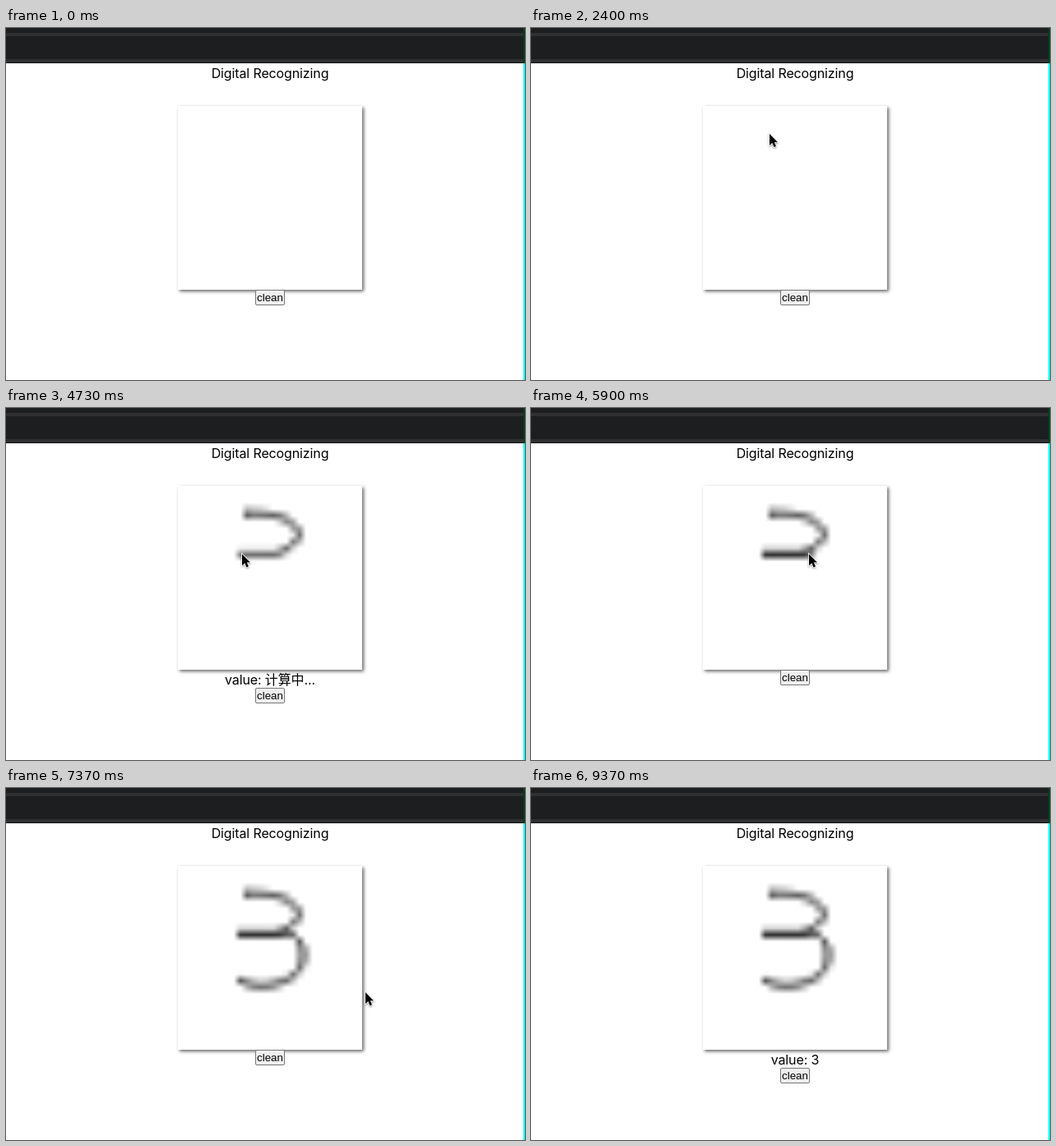
An HTML page with a canvas for the animation above (9.76 s loop, 631x429 px).

```html
<!DOCTYPE html>
<html lang="en">
<head>
<meta charset="utf-8">
<title>Digital Recognizing</title>
<style>
html, body { margin: 0; width: 100%; height: 100%; overflow: hidden; background: #fff; }
body { position: relative; font: 16px/22px Inter, "Noto Sans CJK SC", "Noto Sans CJK", sans-serif; letter-spacing: -.12px; }
body > * { position: absolute; }
#bar { left: 0; top: 0; width: 631px; height: 43px;
  background: linear-gradient(#1d1e20 6px, #303033 6px 10px, #1d1e20 10px 38px, #303033 38px 42px, #141416 42px); }
#edge { left: 629px; top: 0; width: 2px; height: 429px; background: linear-gradient(#04401c 43px, #0ff 43px); }
h1, #value { left: 0; width: 642px; margin: 0; text-align: center; font-size: 16px; font-weight: 400; }
h1 { top: 44px; }
#value { top: 320px; }
#pad { left: 209px; top: 95px; width: 224px; height: 224px; background: #fff; box-shadow: 2px 2px 4px #666; }
#clean { left: 303px; width: 36px; height: 19px; box-sizing: border-box; border: 1px solid #767676; border-radius: 2px;
  background: #efefef; font: 13.33px/17px "Liberation Sans", sans-serif; letter-spacing: 0; text-align: center; }
#cursor { left: 0; top: 0; overflow: visible; filter: drop-shadow(0 1px 1px #0006); }
</style>
</head>
<body>
<div id="bar"></div>
<div id="edge"></div>
<h1>Digital Recognizing</h1>
<canvas id="pad" width="28" height="28"></canvas>
<div id="value"></div>
<div id="clean">clean</div>
<svg id="cursor" width="12" height="18">
  <path d="M0 0V14L3.3 11L5.5 16.2L8 15.1L5.8 10.2H10Z" stroke="#fff" paint-order="stroke" stroke-width="1.6"/>
</svg>
<script>
const LOOP = 9760;
const $ = id => document.getElementById(id);
const ink = $('pad').getContext('2d');

// Pointer moves: start, end, target x, y, and the bend of a curved move
const moves = [
  [1270, 1270, 526, 124], [1270, 1330, 478, 121],
  [1530, 2230, 293, 127, 380, 119], [2370, 2400, 290, 129],
  [2900, 3570, 356, 155, 352, 127], [3570, 3870, 328, 178, 352, 170], [3870, 4330, 287, 178],
  [5500, 5560, 284, 178], [5560, 5940, 344, 178], [5940, 6200, 361, 204, 361, 182],
  [6200, 6470, 338, 235, 361, 228], [6470, 6820, 284, 234, 310, 248],
  [7050, 7470, 481, 256, 390, 240], [7470, 7830, 485, 258], [7830, 8070, 511, 271],
  [8600, 8800, 491, 285], [9030, 9370, 640, 40, 520, 220]
];
const strokes = [[2900, 4330], [5560, 6820]];
const labels = [
  [0, ''], [4730, 'value: 计算中...'], [5000, 'value: 2'], [5530, ''],
  [7400, 'value: 计算中...'], [7900, 'value: 3']
];

function at(t) {
  let x = 640, y = 80;
  for (const [start, end, tx, ty, bx = (x + tx) / 2, by = (y + ty) / 2] of moves) {
    if (t < start) break;
    const k = t < end ? (t - start) / (end - start) : 1;
    const bend = (a, b, c) => a * (1 - k) ** 2 + 2 * b * k * (1 - k) + c * k * k;
    x = bend(x, bx, tx);
    y = bend(y, by, ty);
  }
  return [x, y];
}

function drawInk(t) {
  ink.clearRect(0, 0, 28, 28);
  ink.lineCap = ink.lineJoin = 'round';
  for (const [start, end] of strokes) {
    if (t <= start) continue;
    ink.beginPath();
    for (let s = start; s <= Math.min(t, end); s += 10) {
      const [x, y] = at(s);
      ink.lineTo((x - 209) / 8, (y - 95) / 8);
    }
    ink.stroke();
  }
}

function frame(now) {
  const t = now % LOOP;
  const [x, y] = at(t);
  const text = labels.findLast(l => l[0] <= t)[1];
  drawInk(t);
  $('value').textContent = text;
  $('clean').style.top = (text ? 341 : 319) + 'px';
  $('cursor').style.transform = `translate(${Math.round(x)}px, ${Math.round(y)}px)`;
  requestAnimationFrame(frame);
}
requestAnimationFrame(frame);
</script>
</body>
</html>
```
